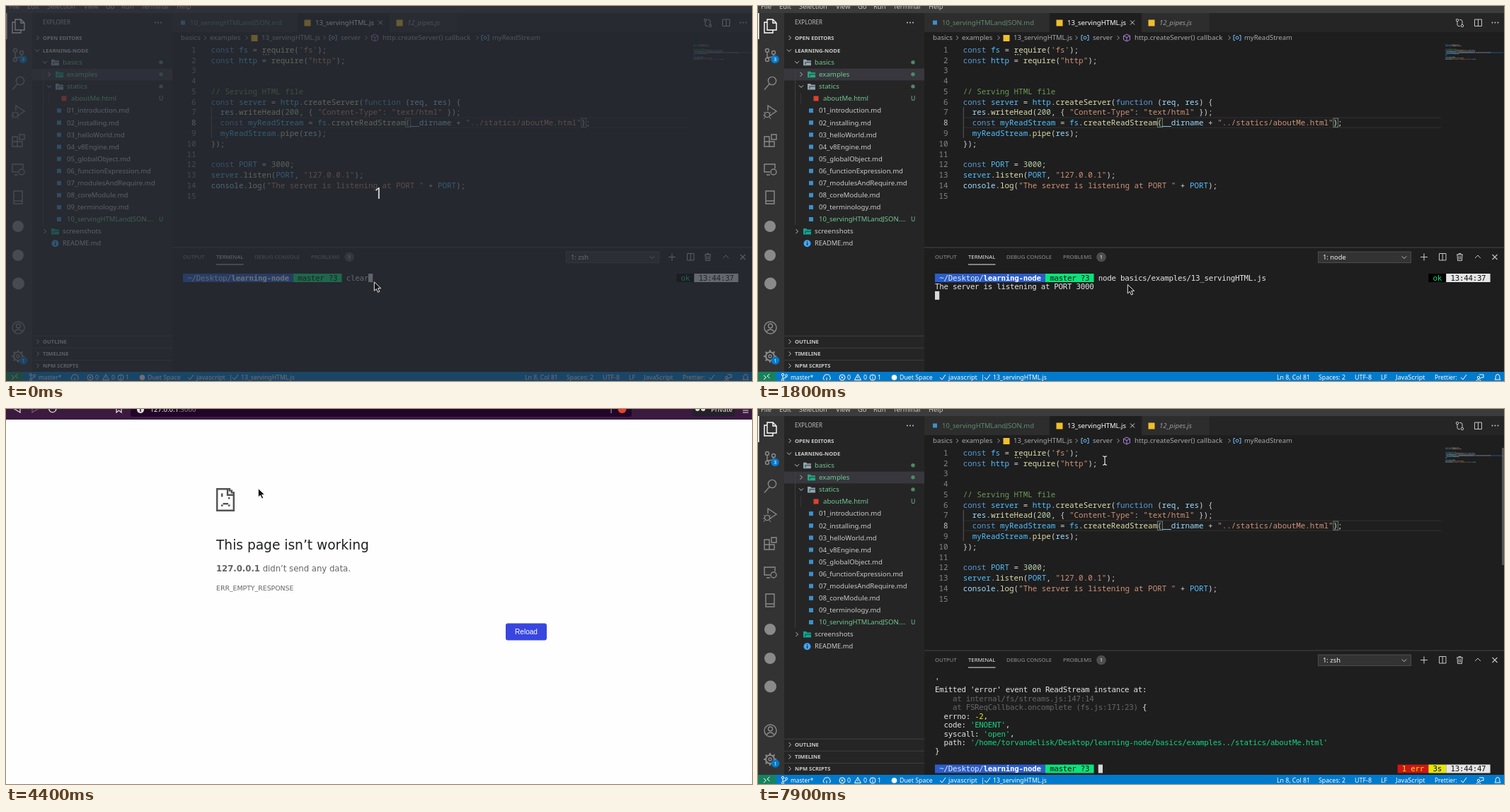
An HTML page that plays this animation: 1054 px wide and 531 px high, repeating every 8 s.

```html
<!DOCTYPE html>
<html lang="en">
<head>
<meta charset="utf-8">
<title>Serving an HTML file</title>
<style>
html, body { margin: 0; width: 100%; height: 100%; overflow: hidden; background: #1e1e1e; }
svg { display: block; width: 1054px; height: 531px; }
text { white-space: pre; font-family: "Noto Sans", "Open Sans", sans-serif; }
.code { font-family: "Noto Sans Mono", monospace; font-size: 10.9px; }
.term { font-family: "DejaVu Sans Mono", monospace; font-size: 10.8px; letter-spacing: -.265px; }
.page { font-family: "DejaVu Sans", Verdana, sans-serif; }
.btn { font-family: "Liberation Sans", Arial, sans-serif; }
</style>
</head>
<body>
<svg id="stage" viewBox="0 0 1054 531"></svg>
<script>
const LOOP = 8000, STEP = 100;
const CH = 6.237, ROW = 12.45;
const GREEN = '#73c991', BLUE = '#007acc', GREY = '#858585';

// Drawing helpers; text is placed by its vertical centre.
const rect = (x, y, w, h, fill, extra = '') =>
  `<rect x="${x}" y="${y}" width="${w}" height="${h}" fill="${fill}" ${extra}/>`;
const dot = (x, y, r, fill, extra = '') => `<circle cx="${x}" cy="${y}" r="${r}" fill="${fill}" ${extra}/>`;
const ring = (x, y, r, color, w = 1) => dot(x, y, r, 'none', `stroke="${color}" stroke-width="${w}"`);
const line = (d, color, w = 1, extra = '') =>
  `<path d="${d}" fill="none" stroke="${color}" stroke-width="${w}" ${extra}/>`;
const text = (x, y, s, fill, size = 9.6, extra = '') =>
  `<text x="${x}" y="${y + size * .35}" fill="${fill}" font-size="${size}" ${extra}>${s}</text>`;
const right = (x, y, w = 3, c = '#c0c0c0') => line(`M${x - w / 2} ${y - w}l${w} ${w}l${-w} ${w}`, c);
const down = (x, y, w = 3, c = '#c0c0c0') => line(`M${x - w} ${y - w / 2}l${w} ${w}l${w} ${-w}`, c);
const cross = (x, y, r, c, w = 1) => line(`M${x - r} ${y - r}l${2 * r} ${2 * r}m0 ${-2 * r}l${-2 * r} ${2 * r}`, c, w);
const check = (x, y) => line(`M${x - 4} ${y}l3 3l5 -7`, '#fff');
const badge = (x, y, n) => dot(x, y, 5.8, BLUE) + text(x, y, n, '#fff', 7.4, 'text-anchor="middle"');

// Runs are split by "|"; the first letter of each run picks its colour.
const INK = {
  k: '#569cd6', c: '#4fc1ff', v: '#9cdcfe', f: '#dcdcaa', s: '#ce9178', n: '#b5cea8', m: '#6a9955',
  w: '#d4d4d4', d: '#666666', g: '#12d47f', y: '#e5e510', b: '#101010', e: '#e5e5e5'
};
const runs = s => s.split('|').map(r => [INK[r[0]], r.slice(1)]);
const rich = (x, y, s, cls) => `<text class="${cls}" x="${x}" y="${y + 3.8}">` +
  runs(s).map(([c, r]) => `<tspan fill="${c}">${r}</tspan>`).join('') + '</text>';

const CODE = [
  "kconst |cfs|w = |frequire|w(|s'fs'|w);",
  'kconst |chttp|w = |frequire|w(|s"http"|w);',
  '', '',
  'm// Serving HTML file',
  'kconst |cserver|w = |chttp|w.|fcreateServer|w(|kfunction|w (|vreq|w, |vres|w) {',
  'w  |vres|w.|fwriteHead|w(|n200|w, { |s"Content-Type"|w: |s"text/html"|w });',
  'w  |kconst |cmyReadStream|w = |cfs|w.|fcreateReadStream|w(|v__dirname|w + |s"../statics/aboutMe.html"|w);',
  'w  |cmyReadStream|w.|fpipe|w(|vres|w);',
  'w});',
  '',
  'kconst |cPORT|w = |n3000|w;',
  'cserver|w.|flisten|w(|cPORT|w, |s"127.0.0.1"|w);',
  'vconsole|w.|flog|w(|s"The server is listening at PORT "|w + |cPORT|w);',
  ''
];

function activityBar() {
  const c = '#8a8a8a', w = 1.4;
  return rect(0, 10, 37, 508, '#333333') + rect(0, 10, 1.6, 37, '#fff') +
    line('M13 19h8l5 5v10h-13zM21 19v5h5M13 23h-4v15h12v-4', '#fff', w) +
    ring(13, 63, 2.5, c, w) + ring(13, 76, 2.5, c, w) + ring(22, 66, 2.5, c, w) +
    line('M13 66v8M22 69q0 4 -9 4', c, w) + badge(24, 75.5, '3') +
    ring(20, 106, 5.6, c, w) + line('M16 110.500l-7 8', c, w) +
    line('M14 148v-7l12 8l-9 6', c, w) + ring(13, 154, 3.6, c, w) + line('M8 150l2 2m6 0l2 -2M7 155h3m6 0h3M8 160l2 -3m6 0l2 3', c) +
    line('M9 185h7v14h-7zM9 192h14v7h-14M19 182h7v7h-7z', c, w) +
    line('M24 230v-6h-15v11h8M12 239h5', c, w) + ring(22, 235, 4, c, w) +
    line('M11 262h12v18h-12zM11 276h12', c, w) +
    dot(17, 312, 8, c) + dot(17, 353, 8, c) + dot(17.5, 393, 8.5, c) +
    ring(17.5, 455.5, 8.5, c, w) + ring(17.5, 453, 3, c, w) + line('M12 461q5.500 -6 11 0', c, w) +
    ring(17, 496, 6, c, 2.2) + ring(17, 496, 2, c, w) + line('M17 487v3m0 12v3M8 496h3m12 0h3M10.600 489.600l2 2m9 9l2 2M10.600 502.400l2 -2m9 -9l2 -2', c, 2) +
    badge(24.5, 502, '1');
}

function folder(x, y, c) {
  return `<path d="M${x} ${y - 4}h4l1.500 1.500h5.500v7h-11z" fill="${c}"/>` +
    line(`M${x + 3} ${y + 3}v-3h8`, '#252526', .8);
}

function sideBar() {
  const rowY = k => 79.7 + 17.1 * k, pale = '#cccccc';
  const head = (y, s, open) => (open ? down(44, y) : right(45, y)) + text(52, y, s, pale, 7.6, 'font-weight="700"');
  const files = ['01_introduction.md', '02_installing.md', '03_helloWorld.md', '04_v8Engine.md', '05_globalObject.md',
    '06_functionExpression.md', '07_modulesAndRequire.md', '08_coreModule.md', '09_terminology.md', '10_servingHTMLandJSON.…'];
  let s = rect(37, 10, 198, 508, '#252526') + text(52, 23.5, 'EXPLORER', '#bbbbbb', 8.1);
  for (const x of [211, 215, 219]) s += dot(x, 23.5, 1, '#c5c5c5');
  s += head(45, 'OPEN EDITORS') + head(63, 'LEARNING-NODE', true) + rect(37, 88.500, 198, 17, '#37373d');
  s += line('M52.500 89V310', '#454545', .8) + line('M60.500 122.500V139', '#3a3a3a', .8);
  s += down(55, rowY(0)) + folder(64, rowY(0), '#90a4ae') + text(80, rowY(0), 'basics', GREEN, 9.7);
  s += right(61, rowY(1)) + folder(70, rowY(1), '#26a682') + text(86, rowY(1), 'examples', GREEN, 9.7);
  s += down(61, rowY(2)) + folder(70, rowY(2), '#90a4ae') + text(86, rowY(2), 'statics', GREEN, 9.7);
  for (const k of [0, 1, 2]) s += dot(219, rowY(k), 2.7, '#4d8a63');
  s += rect(78.5, rowY(3) - 3.500, 7, 7, '#e0402f') + text(92, rowY(3), 'aboutMe.html', GREEN) + text(216, rowY(3), 'U', GREEN, 8.6);
  files.forEach((name, i) => {
    const y = rowY(4 + i), last = i === 9;
    s += rect(72, y - 3, 6, 6, '#3d8fc9') + text(86, y, name, last ? GREEN : pale, last ? 9.45 : 9.6);
    if (last) s += text(216, y, 'U', GREEN, 8.6);
  });
  s += right(55, rowY(14)) + folder(64, rowY(14), '#12a594') + text(80, rowY(14), 'screenshots', pale, 9.7);
  s += dot(69.5, rowY(15), 5, '#42a5f5') + rect(68.9, rowY(15) - .8, 1.3, 3.5, '#222') + rect(68.9, rowY(15) - 3, 1.3, 1.3, '#222');
  s += text(80, rowY(15), 'README.md', pale, 9.3);
  ['OUTLINE', 'TIMELINE', 'NPM SCRIPTS'].forEach((name, i) => {
    const y = 475.3 + 17.1 * i;
    s += rect(37, y - 8.500, 198, .8, '#454545') + head(y, name);
  });
  return s;
}

function topBars() {
  const dim = '#a0a0a0', js = (x, y) => rect(x - 4.500, y - 4.500, 9, 9, '#f0bf2c');
  const symbol = x => line(`M${x - 3} 41.500h-2v7h2M${x + 3} 41.500h2v7h-2`, '#75beff') + ring(x, 45, 2, '#75beff');
  let s = rect(0, 0, 1054, 10, '#3c3c3c');
  [[4, 'File'], [30, 'Edit'], [58, 'Selection'], [110, 'View'], [141, 'Go'], [163, 'Run'], [191, 'Terminal'], [241, 'Help']]
    .forEach(([x, name]) => s += text(x, .8, name, '#cccccc', 9.4));
  s += rect(235, 10, 819, 27, '#252526') + rect(235, 10, 176.500, 27, '#2d2d2d') + rect(412.500, 10, 129, 27, '#1e1e1e') + rect(542.500, 10, 95, 27, '#2d2d2d');
  s += rect(247, 20.500, 6, 6, '#3d8fc9') + text(260, 23.5, '10_servingHTMLandJSON.md', '#5f8c72', 9.46);
  s += js(426, 24) + text(437, 23.5, '13_servingHTML.js', '#fff', 9.46) + cross(529, 23.5, 3, '#d0d0d0');
  s += js(556, 24) + text(567, 23.5, '12_pipes.js', '#9a9a9a', 9.6, 'font-style="italic"');
  s += ring(988, 20, 1.7, '#c5c5c5') + ring(995, 28, 1.7, '#c5c5c5') + line('M988 22v5q0 2 4 1.500M995 26v-5q0 -2 -4 -1.500', '#c5c5c5');
  s += line('M1012.500 19h10v9.500h-10zM1017.500 19v9.500', '#c5c5c5');
  for (const x of [1037.5, 1041.5, 1045.5]) s += dot(x, 23.5, 1, '#c5c5c5');
  for (const x of [281.5, 340, 450, 509, 666]) s += right(x, 45, 2.8, dim);
  [[247, 'basics', 9.7], [288, 'examples', 9.7], [361, '13_servingHTML.js', 9.46], [473, 'server', 9.6],
    [532, 'http.createServer() callback', 9.76], [687, 'myReadStream', 9.46]]
    .forEach(([x, name, size]) => s += text(x, 45, name, '#a9a9a9', size));
  s += js(351, 45.5) + symbol(462) + symbol(677);
  return s + line('M521 40l4.500 2.300v5.400l-4.500 2.300l-4.500 -2.300v-5.400zM516.500 42.300l4.500 2.300l4.500 -2.300M521 44.600v5.400', '#b180d7');
}

function editor() {
  let s = rect(235, 37, 819, 305, '#1e1e1e');
  s += rect(290, 157.600, 675, 1, '#303030') + rect(290, 171.800, 675, 1, '#303030') + rect(289.800, 143, .9, 44, '#606060');
  s += rect(971, 65.300, 82, 1.400, '#264f78', 'opacity=".8"');
  for (const x of [564.6, 812.9]) s += rect(x, 159, 6.800, 12.500, '#1c291f', 'stroke="#888" stroke-width=".8"');
  CODE.forEach((src, i) => {
    const y = 62 + 14.77 * i;
    s += `<text class="code" x="268.500" y="${y + 3.8}" text-anchor="end" fill="${i === 7 ? '#c6c6c6' : GREY}">${i + 1}</text>`;
    if (!src) return;
    s += rich(289.7, y, src, 'code');
    let x = 971;
    for (const [c, r] of runs(src)) {
      for (const word of r.matchAll(/\S+/g))
        s += rect(x + word.index * .78, 54.5 + i * 1.56, word[0].length * .78, 1, c, 'opacity=".45"');
      x += r.length * .78;
    }
  });
  for (const x of [363, 366.5, 370]) s += rect(x, 68, 1.400, 1.400, '#c8c8b0');
  return s;
}

function panel() {
  const c = '#c5c5c5';
  let s = rect(235, 342, 819, 176, '#1e1e1e') + rect(235, 341.500, 819, 1, '#454545');
  [[250, 'OUTPUT'], [297, 'TERMINAL'], [351, 'DEBUG CONSOLE'], [431, 'PROBLEMS']]
    .forEach(([x, name]) => s += text(x, 355.500, name, x === 297 ? '#e7e7e7' : '#949494', 7.8));
  s += rect(297, 365.500, 38.500, 1, '#e7e7e7') + dot(485, 355.500, 6.800, '#4d4d4d') + text(485, 355.500, '1', '#fff', 7.6, 'text-anchor="middle"');
  s += rect(791.500, 348, 131, 15.500, '#333333', 'stroke="#555" stroke-width=".8"') + down(913, 356, 3.2);
  s += line('M936 355.500h10m-5 -5v10', c, 1.1) + line('M962.500 350.500h9.500v9.500h-9.500zM967.200 350.500v9.500', c) +
    line('M987 352h9M990 352v-1.500h3v1.500M988 352l.5 8.500h6l.5 -8.500M990.300 354v5M992.700 354v5', c);
  return s + line('M1013 357l4 -4l4 4', c) + cross(1041, 355.500, 3.5, c, 1.1);
}

function statusBar() {
  let s = rect(0, 518, 1054, 13, BLUE) + rect(0, 518, 25, 13, '#16825d');
  s += line('M8 523l3.500 3l-3.500 3M16.500 521l-3.500 3l3.500 3', '#fff');
  s += ring(35, 522, 1.6, '#fff') + ring(35, 529.500, 1.6, '#fff') + ring(40, 523.500, 1.6, '#fff') + line('M35 524v4M40 525q0 2 -4 2', '#fff');
  s += line('M94 529h-1q-2 -2 0 -4q1 -4 4 -3q4 -1 4.500 3q2 2 0 4h-1M97 530v-4', '#fff');
  s += ring(119, 526, 4, '#fff') + cross(119, 526, 1.6, '#fff') + line('M141 521.500l4.500 8h-9zM141 524.500v3', '#fff') +
    ring(162, 526, 4, '#fff') + line('M162 525.500v3M162 523.300v1.200', '#fff') + dot(192.500, 526, 3.800, '#fff');
  [[46, 'master*', 8.4], [126, '0'], [149, '0'], [169, '1'], [200, 'Duet Space'], [269, 'javascript', 9.1], [315, '|'],
    [332, '13_servingHTML.js', 8.66], [733, 'Ln 8, Col 81', 8.7], [792, 'Spaces: 2', 8.74], [843, 'UTF-8', 8.9],
    [880, 'LF', 8.7], [901, 'JavaScript', 9.1], [956, 'Prettier:', 8.4]]
    .forEach(([x, name, size = 8.8]) => s += text(x, 526, name, '#fff', size));
  s += check(261, 526) + check(324, 526) + check(997, 526);
  s += line('M1019 522h6v4h-3l-2 2', '#fff') + ring(1018, 526, 1.7, '#fff') + line('M1014.500 531q3.500 -4 7 0', '#fff');
  return s + line('M1041 529h8l-1.200 -2v-2.500q-.6 -3 -2.800 -3q-2.200 0 -2.800 3v2.500z', '#fff');
}

function terminal(t) {
  const x0 = 250, late = t >= 5500, running = t >= 1000 && !late;
  const rowY = r => 385 + r * ROW, put = (col, r, s) => rich(x0 + col * CH, rowY(r), s, 'term');
  const block = (col, r, n, c) => rect(x0 + col * CH, rowY(r) - 6, n * CH, 12, c);
  const caret = (col, r) => block(col, r, 1, '#d8d8d8');
  const chip = (col, r, s, bg, ink) => block(col, r, s.length, bg) + put(col, r, ink + s);
  const clock = (r, time) => chip(115.8, r, ` ${time} `, '#e5e5e5', 'b');
  const prompt = r => block(0, r, 25, '#2a5dc9') + put(1, r, 'e~/Desktop/') +
    `<text class="term" x="${x0 + 11 * CH}" y="${rowY(r) + 3.8}" fill="#fff" font-weight="700">learning-node</text>` +
    chip(25, r, ' master ?3 ', '#0be37b', 'b');
  let s = text(798, 355.800, running ? '1: node' : '1: zsh', '#f0f0f0', 9.4);
  if (late) {
    ["e'", "eEmitted 'error' event on ReadStream instance at:", 'd    at internal/fs/streams.js:147:14',
      'd    at FSReqCallback.oncomplete (fs.js:171:23)|e {', 'e  errno: |y-2|e,', "e  code: |g'ENOENT'|e,", "e  syscall: |g'open'|e,",
      "e  path: |g'/home/torvandelisk/Desktop/learning-node/basics/examples../statics/aboutMe.html'", 'e}']
      .forEach((row, r) => s += put(0, r, row));
    return s + prompt(10) + caret(37, 10) + chip(104.8, 10, ' 1 err ', '#cd1515', 'y') +
      chip(111.8, 10, ' 3s ', '#e5e510', 'b') + clock(10, '13:44:47');
  }
  s += prompt(0) + put(37, 0, t < 400 ? 'eclear' : 'enode basics/examples/13_servingHTML.js');
  s += chip(111.8, 0, ' ok ', '#000', 'g') + clock(0, '13:44:37');
  if (running) return s + put(0, 1, 'eThe server is listening at PORT 3000') + caret(0, 2);
  return s + (t < 400 ? caret(42, 0) : t < 800 ? caret(75, 0) : caret(0, 1));
}

function browser(t) {
  const soft = '#646464', c = '#e6dfe8', body = 'class="page"';
  const host = rest => text(297, 226, `<tspan font-weight="700">127.0.0.1</tspan> ${rest}`, soft, 11.67, body);
  const reload = y => rect(706, y - 12, 58, 24, '#3846df', 'rx="3"') + text(735, y, 'Reload', '#fff', 10.1, 'class="btn" text-anchor="middle"');
  let s = rect(0, 0, 1054, 531, '#fefefe') + rect(0, 0, 1054, 15, '#3b1a40') + rect(176, -10, 708, 21, '#210629', 'rx="3"');
  s += line('M20 -4v9l-8 -5z', c, 1.2) + line('M37 -4v9l8 -5z', '#75597a', 1.2);
  s += t === 4300 ? cross(66, 0, 4, c, 1.3) : line('M70.500 -2a5 5 0 1 1 -2 -2.500', c, 1.3);
  s += line('M156 -5v10l3.500 -3l3.500 3v-10', c, 1.2) + dot(190, 1, 5, c) + rect(189.300, 0, 1.400, 4, '#210629');
  s += text(203.5, .3, '127.0.0.1<tspan fill="#8f7f95">:3000</tspan>', '#f0eaf2', 9.57) + rect(854.500, 0, 1, 6, '#b0a4b4') + dot(870.500, 0, 6, '#e8432b');
  s += rect(970, -10, 60, 20.500, '#25202b', 'rx="3"') + dot(977, 0, 3, '#ddd') + dot(985, 0, 3, '#ddd') + text(996, .3, 'Private', '#eee', 9.4);
  s += line('M1041 -1h8M1041 2h8M1041 5h8', c, 1.2);
  s += line('M298.200 113.200H316v2.400h2.800v2.800h3V143.800H298.200zM313 113.200v8.600h8.800', '#535353', 2.4);
  s += rect(304, 119.500, 2.400, 4.800, '#535353') + rect(314, 125, 2.400, 2.400, '#535353');
  s += rect(306.500, 133, 7.500, 2.400, '#535353') + rect(304, 135.400, 2.500, 2.400, '#535353') + rect(314, 135.400, 2.500, 2.400, '#535353');
  if (t >= 4400)
    return s + text(297, 192.300, 'This page isn’t working', '#202124', 18.6, body) + host('didn’t send any data.') +
      text(297, 254, 'ERR_EMPTY_RESPONSE', soft, 9.35, body) + reload(315.500);
  s += text(297, 192.300, 'This site can’t be reached', '#202124', 18.6, body) + host('refused to connect.');
  s += text(297, 256.500, 'Try:', soft, 11.67, body) + dot(318.500, 275.500, 2, soft) + dot(318.500, 294.300, 2, soft);
  s += text(328, 275, 'Checking the connection', soft, 11.67, body) + text(328, 293.700, 'Checking the proxy and the firewall', '#3253ad', 11.67, body);
  s += text(297, 324, 'ERR_CONNECTION_REFUSED', soft, 9.35, body);
  return s + rect(297.500, 373.500, 57, 25, '#fff', 'rx="3" stroke="#8c8c8c"') +
    text(326, 386, 'Details', soft, 10.1, 'class="btn" text-anchor="middle"') + reload(385.500);
}

// Pointer route: time, x, y; jumps are two stops one step apart.
const ROUTE = [[0, 520.3, 390.8], [300, 520.3, 390.8], [400, 522.3, 393], [1100, 522.3, 393], [1300, 523.3, 393], [1500, 523.3, 393],
  [1600, 523.5, 396], [1700, 523.5, 396], [1800, 522.3, 394.5], [1900, 522.3, 394.5], [2400, 356.3, 112.500], [5400, 356.3, 112.500],
  [5500, 368, 104], [5600, 368, 104], [6000, 570, 450], [6100, 570, 450], [6400, 412, 482], [6800, 652, 475],
  [6900, 652, 475], [7800, 507, 103], [7900, 490, 73], [8000, 490, 73]];
const smooth = p => p * p * (3 - 2 * p);

function pointerAt(t) {
  const i = ROUTE.findIndex(r => r[0] > t);
  const [t0, x0, y0] = ROUTE[i - 1], [t1, x1, y1] = ROUTE[i], p = smooth((t - t0) / (t1 - t0));
  return [x0 + (x1 - x0) * p, y0 + (y1 - y0) * p];
}

function pointer(t) {
  const [x, y] = pointerAt(t), at = `transform="translate(${x} ${y})"`;
  const arrow = t < 400 || (t >= 1800 && t < 5700);
  if (arrow) return `<path ${at} d="M0 0v12.500l3 -2.700l2.200 4.700l2.200 -1l-2.100 -4.600h4z" fill="#111" stroke="#fff" stroke-width=".9"/>`;
  const beam = 'M-3 -6.200q3 0 3 1.800v8.800q0 1.800 -3 1.800M3 -6.200q-3 0 -3 1.800v8.800q0 1.800 3 1.800';
  return line(beam, '#111', 2.6, at) + line(beam, '#fff', 1.1, at);
}

// The editor scrollbar shows only while the pointer is over the code.
const scrollbar = t => pointerAt(t)[1] < 342 ? rect(1051, 55, 3, 166, '#797979', 'opacity=".6"') : '';

const countdown = () => rect(0, 0, 1054, 531, '#282d35', 'opacity=".68"') +
  text(526.3, 265.300, '1', '#dcdcdc', 21, 'text-anchor="middle"');

const stage = document.getElementById('stage');
stage.innerHTML = `<g>${activityBar()}${sideBar()}${editor()}${topBars()}${panel()}${statusBar()}</g><g></g>`;
const live = stage.lastElementChild;
let shown = -1;

function draw(now) {
  const t = Math.floor((now % LOOP) / STEP) * STEP;
  if (t !== shown) {
    shown = t;
    const page = t >= 1900 && t < 5500;
    live.innerHTML = (page ? browser(t) : terminal(t) + scrollbar(t)) + (t < 400 ? countdown() : '') + pointer(t);
  }
  requestAnimationFrame(draw);
}
draw(performance.now());
</script>
</body>
</html>
```
